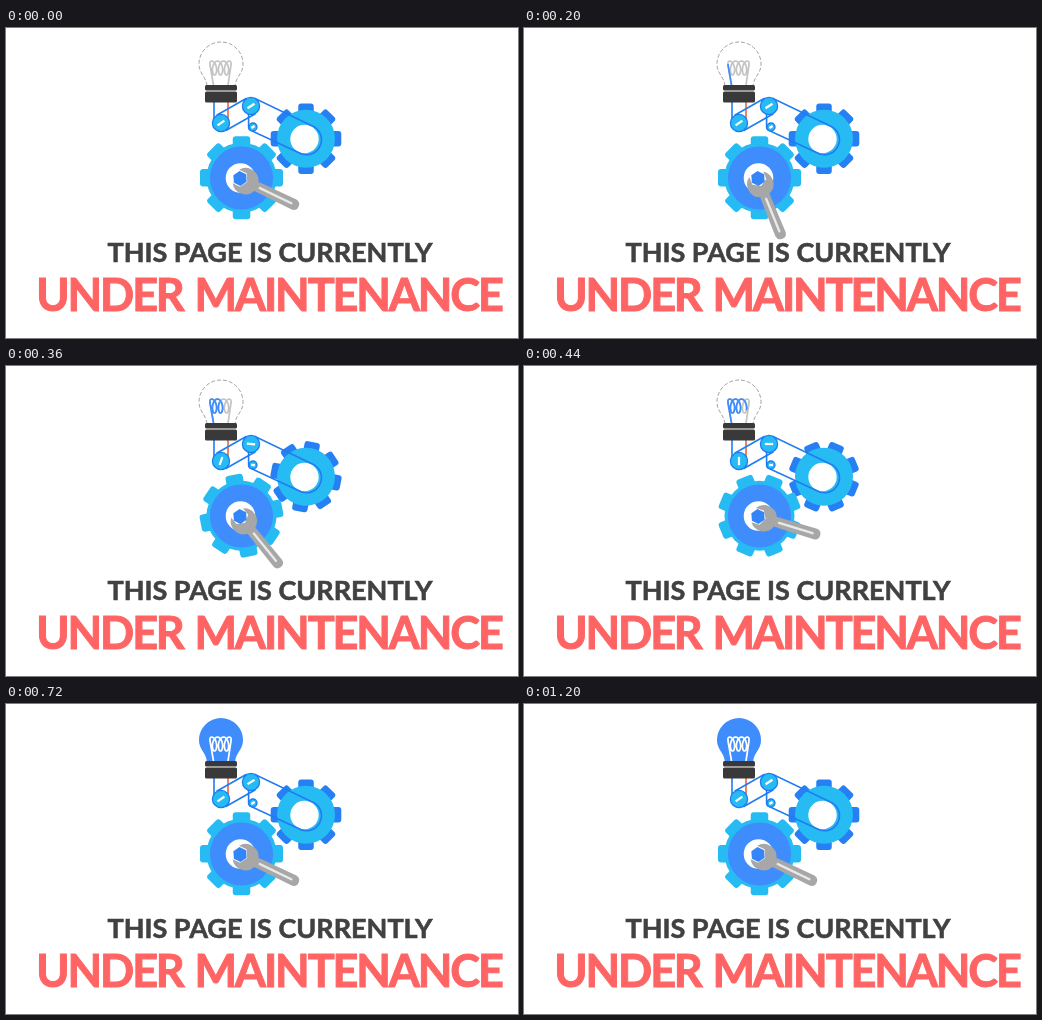
An HTML page for the animation above (1520 ms loop, 512 by 310 pixels).

```html
<!DOCTYPE html>
<html lang="en">
<head>
<meta charset="utf-8">
<title>Under maintenance</title>
<style>
  html, body { margin: 0; width: 100%; height: 100%; overflow: hidden; background: #fff; }
  svg { display: block; width: 512px; height: 310px; }
  text { font-family: Lato, sans-serif; font-weight: 700; text-anchor: middle; }
  .small { font-size: 27px; fill: #414042; stroke: #414042; stroke-width: .6; }
  .large { font-size: 45px; fill: #ff6464; stroke: #ff6464; stroke-width: 1; letter-spacing: -2.15px; word-spacing: 3px; }
  .line { fill: none; stroke: #1f7cf2; stroke-width: 1.6; }
  .coil { fill: none; stroke-width: 1.7; stroke-linejoin: round; }
  .mark { stroke: #fff; stroke-width: 2.2; }
</style>
</head>
<body>
<svg viewBox="0 0 512 310">
  <path class="line" d="M208 73V95"/>
  <path d="M222 73V91" fill="none" stroke="#e8643c" stroke-width="1.6"/>

  <path id="glass" d="M201 58C200 48 193 46 193 36A22 22 0 0 1 237 36C237 46 230 48 229 58Z"
    stroke="#666" stroke-width=".6" stroke-dasharray="4 2"/>
  <path class="coil" id="coil" stroke="#c4c4c4"/>
  <path class="coil" id="live" pathLength="100"/>
  <rect x="199" y="57" width="32" height="5.4" rx="1.5" fill="#393939"/>
  <rect x="199" y="63.4" width="32" height="11" rx="1.5" fill="#393939"/>

  <g id="gearR"></g>
  <circle cx="298.5" cy="111" r="14.2" fill="#fff"/>
  <path class="line" d="M248.6 70.3L305.3 97.4A15.1 15.1 0 1 1 292.4 124.5L245.2 102.6A4 4 0 0 1 242.6 99V80"/>
  <path class="line" d="M210.6 87.2L240.6 70.2M219.4 102.8L249.4 85.8"/>
  <g id="pulleys"></g>

  <g id="gearL"></g>
  <circle cx="235.5" cy="150" r="31.6" fill="#3f8cfd"/>
  <circle cx="234.5" cy="150" r="14.8" fill="#fff"/>
  <g id="wrench">
    <path fill="#a7a7a7" d="M-4.6 -7.5A13 13 0 0 1 18.2 -5L60 -5.5Q65 -5 65 0T60 5.5L18.2 5A13 13 0 0 1 -4.6 7.5L3.7 7.5L8 0L3.7 -7.5Z"/>
    <path d="M22 0H57" stroke="#e9e9e9" stroke-width="2.4" stroke-linecap="round"/>
  </g>
  <path id="nut" fill="#3585fa"/>

  <text class="small" x="264" y="234">THIS PAGE IS CURRENTLY</text>
  <text class="large" x="263" y="283.3">UNDER MAINTENANCE</text>
</svg>
<script>
const LOOP = 1520, STEP = 40;
const $ = id => document.getElementById(id);

function buildGear(el, r, outer, width, body, teeth) {
  let html = '';
  for (let a = 0; a < 360; a += 45)
    html += `<rect x="${-width / 2}" y="${-outer}" width="${width}" height="16" rx="3" fill="${teeth}" transform="rotate(${a})"/>`;
  el.innerHTML = html + `<circle r="${r}" fill="${body}"/>`;
}

buildGear($('gearL'), 35, 41.5, 17.5, '#27bbf3', '#27bbf3');
buildGear($('gearR'), 29, 35.3, 15.5, '#27bbf3', '#267ff3');

const pulleys = [[215, 95, 8.6], [245, 78, 8.6], [247, 99, 4]].map(([x, y, r]) => {
  const m = r * .48;
  $('pulleys').insertAdjacentHTML('beforeend',
    `<g transform="translate(${x} ${y})"><circle r="${r}" fill="#27bbf3" stroke="#1f7cf2" stroke-width="1.3"/>` +
    `<path class="mark" d="M${-m} 0H${m}"/></g>`);
  return $('pulleys').lastChild.lastChild;
});

// hexagonal nut
const hex = [...Array(6).keys()].map(i => {
  const a = (i * 60 + 26) * Math.PI / 180;
  return `${234 + 7.4 * Math.cos(a)} ${150.5 + 7.4 * Math.sin(a)}`;
});
$('nut').setAttribute('d', `M${hex.join('L')}Z`);

// filament: two stems joined by three loops
let coil = 'M207.5 57L204 37Q203.5 33 205.5 33';
for (let i = 1; i <= 60; i++) {
  const u = i / 60, a = u * Math.PI * 6;
  coil += `L${(205.5 + 18 * u + 3.5 * Math.sin(a)).toFixed(2)} ${(40 - 7 * Math.cos(a)).toFixed(2)}`;
}
coil += 'Q225.5 33 225 37L222 57';
$('coil').setAttribute('d', coil);
$('live').setAttribute('d', coil);

// [time, value] steps, eased between
const tracks = {
  wrench: [[40, 25.7], [220, 69.5], [270, 70.7], [360, 51], [440, 17], [520, 21], [600, 25.7]],
  gear: [[240, 0], [360, -11], [440, -22.5], [600, -52], [720, -45]],
  pulley1: [[240, -35], [360, -70], [440, -90], [600, -145], [720, -214], [1200, -215]],
  pulley2: [[240, -33], [360, -175], [440, -180], [600, -209], [720, -212], [1200, -213]],
  current: [[150, 0], [360, 58], [440, 70], [560, 100]],
  glow: [[600, 0], [720, 1]]
};
const linear = { gear: true, current: true, glow: true };

function at(name, t) {
  const k = tracks[name];
  if (t <= k[0][0]) return k[0][1];
  for (let i = 1; i < k.length; i++) {
    const [t0, v0] = k[i - 1], [t1, v1] = k[i];
    if (t < t1) {
      const u = (t - t0) / (t1 - t0);
      return v0 + (v1 - v0) * (linear[name] ? u : u * u * (3 - 2 * u));
    }
  }
  return k[k.length - 1][1];
}

const mix = (a, b, u) => `rgb(${a.map((v, i) => Math.round(v + (b[i] - v) * u))})`;
const WHITE = [255, 255, 255], BLUE = [63, 140, 253];
const pose = (el, x, y, a) => el.setAttribute('transform', `translate(${x} ${y}) rotate(${a})`);

function draw(now) {
  const t = Math.floor(now % LOOP / STEP) * STEP;
  const gear = at('gear', t), glow = at('glow', t), current = at('current', t);
  const p2 = at('pulley2', t);
  pose($('wrench'), 234, 150.5, at('wrench', t));
  pose($('gearL'), 235.5, 149.7, gear);
  pose($('gearR'), 300, 110.7, -gear);
  [at('pulley1', t), p2, p2].forEach((a, i) => pulleys[i].setAttribute('transform', `rotate(${a})`));
  $('glass').setAttribute('fill', mix(WHITE, BLUE, glow));
  $('glass').setAttribute('stroke-opacity', 1 - glow);
  $('coil').setAttribute('visibility', current < 100 ? 'visible' : 'hidden');
  $('live').setAttribute('stroke', mix(BLUE, WHITE, glow));
  $('live').setAttribute('stroke-dasharray', current < 100 ? `${current} 200` : 'none');
}

const start = performance.now();
function tick() {
  draw(performance.now() - start);
  requestAnimationFrame(tick);
}
tick();
</script>
</body>
</html>
```
